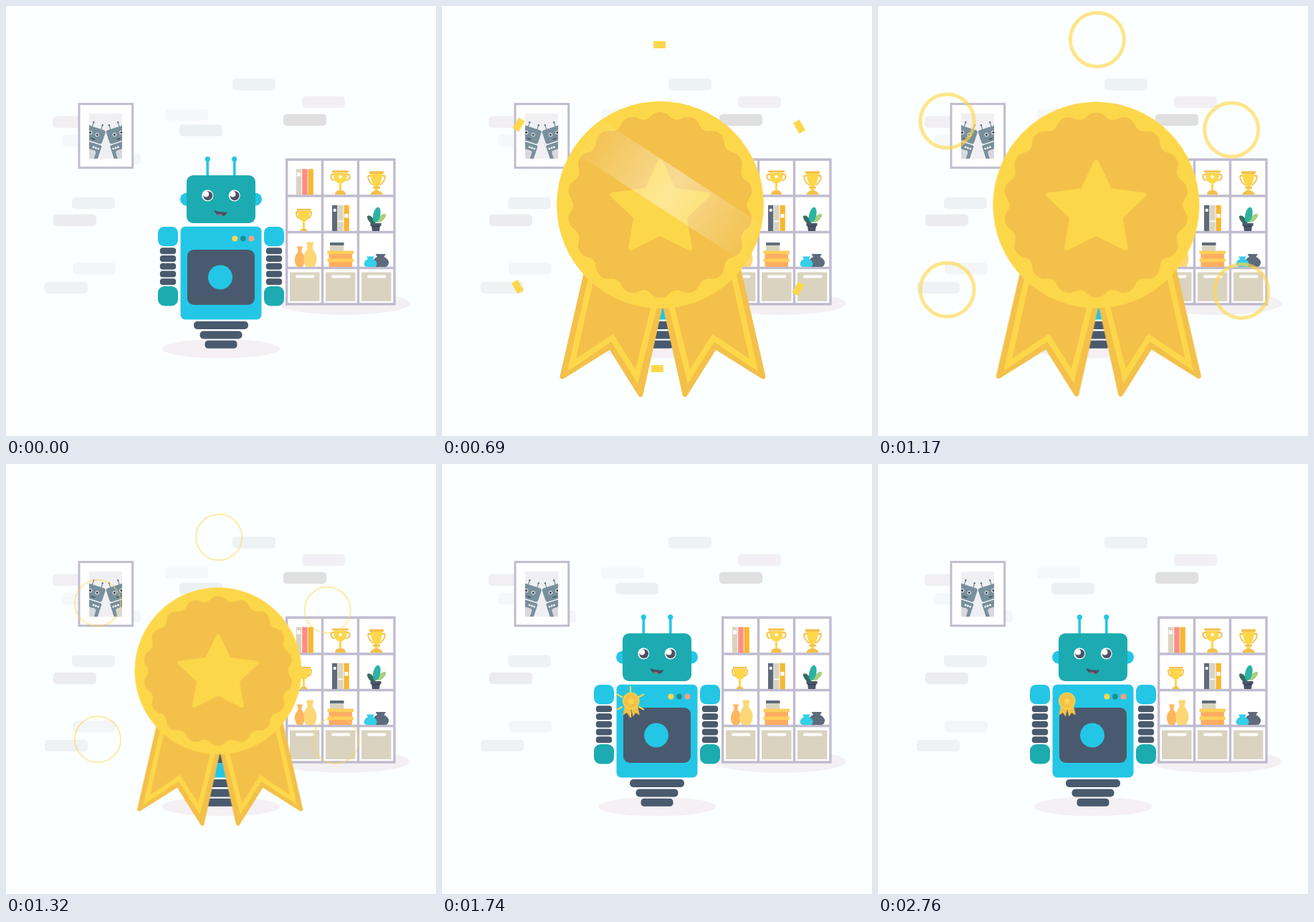
These frames come from a looping animation (600 by 600 pixels, 3600 ms). An HTML page without scripts:

```html
<!DOCTYPE html>
<html lang="en">
<head>
<meta charset="utf-8">
<title>Robot earns a medal</title>
<style>
  html, body { margin: 0; width: 100%; height: 100%; overflow: hidden; background: #fcffff; }
  svg { display: block; width: 100%; height: 100%; }
  .cyan { fill: #24c6e6; }
  .teal { fill: #1cabb0; }
  .slate { fill: #4a5a6e; }
  .gold { fill: #fdd74a; }
  .amber { fill: #f3c04a; }
  .sand { fill: #d9d3c0; }
  .orange { fill: #f7b731; }
  .white { fill: #fff; }

  .grow, .shrink, .ribbon, .shine, .hop, .spark, .rings circle {
    animation: 3.6s linear infinite both;
  }

  .grow { animation-name: grow; transform-origin: 304.5px 277.5px; }
  @keyframes grow {
    0%, .833% { transform: scale(0); animation-timing-function: cubic-bezier(.2, .8, .3, 1); }
    8.333%, 100% { transform: none; }
  }

  .shrink { animation-name: shrink; transform-origin: 260.1px 335.2px; }
  @keyframes shrink {
    0%, 31.667% { transform: scale(1); animation-timing-function: cubic-bezier(.65, 0, .35, 1); }
    45%, 100% { transform: scale(.0816); }
  }

  .ribbon { animation-name: ribbon; }
  .late { animation-delay: 30ms; }
  @keyframes ribbon {
    0%, 5% { transform: translate(42px, -180px); animation-timing-function: cubic-bezier(.33, 1, .68, 1); }
    14.167%, 100% { transform: none; }
  }

  .shine { animation-name: shine; }
  @keyframes shine {
    0%, 15.83% { transform: translateY(-190px); }
    23.6%, 100% { transform: translateY(190px); }
  }

  .spark { animation-name: spark; fill: none; stroke: #fdd74a; stroke-width: 17; }
  .again { animation-delay: 1.41s; }
  @keyframes spark {
    0%, 3.06% { stroke-dasharray: 0 400; stroke-dashoffset: 0; }
    4.72% { stroke-dasharray: 68 400; stroke-dashoffset: 0; }
    6.39% { stroke-dasharray: 116 400; stroke-dashoffset: 0; }
    8.06% { stroke-dasharray: 83 400; stroke-dashoffset: -68; }
    9.72% { stroke-dasharray: 61 400; stroke-dashoffset: -116; }
    12.22% { stroke-dasharray: 37 400; stroke-dashoffset: -165; }
    15% { stroke-dasharray: 21 400; stroke-dashoffset: -197; }
    19.17% { stroke-dasharray: 10 400; stroke-dashoffset: -221; }
    23.33% { stroke-dasharray: 4.2 400; stroke-dashoffset: -232.8; }
    26.67% { stroke-dasharray: 1.8 400; stroke-dashoffset: -237.2; }
    30%, 100% { stroke-dasharray: 0 400; stroke-dashoffset: -240; }
  }

  .rings { fill: none; stroke: #fdd74a; opacity: .65; }
  .rings circle { animation-name: ring; }
  @keyframes ring {
    0%, 23.3% { r: 0; stroke-width: 0; }
    25% { r: 16px; stroke-width: 14px; }
    26.667% { r: 25.5px; stroke-width: 10.8px; }
    30% { r: 34.2px; stroke-width: 7px; }
    31.667% { r: 37.2px; stroke-width: 5.6px; }
    36.667% { r: 39.8px; stroke-width: 1.9px; }
    39%, 100% { r: 40.5px; stroke-width: 0; }
  }

  .hop { animation-name: hop; }
  @keyframes hop {
    0%, 60% { transform: none; animation-timing-function: cubic-bezier(.39, .575, .565, 1); }
    68.75% { transform: translateY(var(--lift)); animation-timing-function: cubic-bezier(.47, 0, .745, .715); }
    76.667%, 100% { transform: none; }
  }
</style>
</head>
<body>
<svg viewBox="0 0 600 600">
  <defs>
    <rect id="brick" width="60" height="16.5" rx="5"/>
    <clipPath id="photo"><rect x="116" y="150" width="46" height="63"/></clipPath>
    <clipPath id="disc"><circle cx="304.5" cy="277.5" r="144.5"/></clipPath>
    <linearGradient id="glow">
      <stop offset="0" stop-color="#fff" stop-opacity="0"/>
      <stop offset=".5" stop-color="#fff" stop-opacity=".42"/>
      <stop offset="1" stop-color="#fff" stop-opacity="0"/>
    </linearGradient>

    <g id="pal" transform="translate(125 180) rotate(18)">
      <path d="M-8 -9V-16M5 -9V-16" stroke="#78909c" stroke-width="1.2"/>
      <circle cx="-8" cy="-16" r="1.3" fill="#66788a"/>
      <circle cx="5" cy="-16" r="1.3" fill="#66788a"/>
      <rect x="-15" y="-10" width="27" height="20" rx="3" fill="#78909c"/>
      <rect x="-13" y="11.5" width="26" height="30" rx="2" fill="#78909c"/>
      <rect x="-12" y="21" width="20" height="20" rx="3" fill="#d8d9de"/>
      <g class="white">
        <circle cx="-8" cy="-1" r="2.6"/><circle cx="2" cy="-1" r="2.6"/>
        <circle cx="2.5" cy="17" r="1.4"/><circle cx="6" cy="17" r="1.4"/><circle cx="9.5" cy="17" r="1.4"/>
      </g>
      <circle cx="-8" cy="-1" r="1.7" fill="#46505e"/>
      <circle cx="2" cy="-1" r="1.7" fill="#46505e"/>
      <path d="M-6 5.5h8q-3 3.5 -8 0z" fill="#46505e"/>
    </g>

    <g id="bin">
      <rect x="396" y="371.500" width="41.500" height="40.500" class="sand"/>
      <rect x="404" y="375.500" width="26.500" height="4" rx="2" class="white"/>
    </g>

    <g id="eye">
      <circle r="8" class="white"/>
      <circle cx=".4" cy=".2" r="6.500" fill="#4f5166"/>
      <circle cx="-2.200" cy="-2" r="4" class="white"/>
    </g>

    <g id="arm">
      <rect x="212" y="308" width="28" height="27.300" rx="8.500" class="cyan"/>
      <g class="slate">
        <rect x="214.800" y="337.200" width="22.400" height="9" rx="4"/>
        <rect x="214.800" y="348" width="22.400" height="9" rx="4"/>
        <rect x="214.800" y="358.800" width="22.400" height="9" rx="4"/>
        <rect x="214.800" y="369.400" width="22.400" height="9" rx="4"/>
        <rect x="214.800" y="380.200" width="22.400" height="9" rx="4"/>
      </g>
      <rect x="212" y="391" width="28" height="27.500" rx="9" class="teal"/>
    </g>

    <g id="tail">
      <path d="M211 330L168 517L235 475L277 542L324 330Z" class="amber" stroke="#f3c04a" stroke-width="7" stroke-linejoin="round"/>
      <path d="M219 330L181 501L237.500 463L271.500 517L318 330" fill="none" stroke="#fdd74a" stroke-width="8"/>
    </g>

    <path id="lobe" d="M-21 -119.200C-12 -120.800 -12 -129.500 0 -129.500S12 -120.800 21 -119.200L0 -60Z"/>
    <g id="lobes">
      <use href="#lobe"/>
      <use href="#lobe" transform="rotate(20)"/>
      <use href="#lobe" transform="rotate(40)"/>
    </g>
  </defs>

  <!-- wall -->
  <use href="#brick" x="316" y="101.500" fill="#edf2f3"/>
  <use href="#brick" x="413" y="125.700" fill="#f2f0f4"/>
  <use href="#brick" x="387" y="150.700" fill="#e0e0e0"/>
  <use href="#brick" x="222" y="143.700" fill="#f5f8f9"/>
  <use href="#brick" x="242" y="165.500" fill="#ebf1f2"/>
  <use href="#brick" x="65" y="153.500" fill="#f1eff2"/>
  <use href="#brick" x="78" y="179.700" fill="#f5f8f9"/>
  <use href="#brick" x="128" y="204.700" fill="#f4f5f7"/>
  <use href="#brick" x="92" y="266.700" fill="#edf2f4"/>
  <use href="#brick" x="66" y="290.700" fill="#ececee"/>
  <use href="#brick" x="93" y="358" fill="#f4f5f6"/>
  <use href="#brick" x="54" y="384.800" fill="#eef2f4"/>

  <rect x="102" y="136.700" width="74.700" height="89" fill="#fff" stroke="#c0bccf" stroke-width="3"/>
  <g clip-path="url(#photo)">
    <rect x="116" y="150" width="46" height="63" fill="#f0eff3"/>
    <use href="#pal"/>
    <use href="#pal" transform="translate(278.600) scale(-1 1)"/>
  </g>

  <!-- shelf -->
  <ellipse cx="472" cy="415" rx="92" ry="16" fill="#f3f0f4"/>
  <path d="M391.700 214.200H542V416H391.700ZM441.500 214V416M491.500 214V416M391 265H542M391 315.500H542M391 365.500H542" fill="#fff" stroke="#c0bccf" stroke-width="3.400"/>
  <use href="#bin"/>
  <use href="#bin" x="50"/>
  <use href="#bin" x="100"/>

  <rect x="405" y="227.500" width="7.200" height="36" class="sand"/>
  <rect x="406" y="232" width="5.200" height="5.500" class="white"/>
  <rect x="413.200" y="227.500" width="7.500" height="36" fill="#ff8d85"/>
  <rect x="421.500" y="227.500" width="7.300" height="36" class="orange"/>

  <g class="gold">
    <rect x="455" y="229.500" width="23" height="3" rx="1" class="amber"/>
    <path d="M457 233H476Q476 246 468 247.500V257H465V247.500Q457 246 457 233Z"/>
    <path d="M458 235H456Q453 235 453.500 239T459 243M475 235H477Q480 235 479.500 239T474 243" fill="none" stroke="#f3c04a" stroke-width="2"/>
    <path d="M459 263.300Q459 257 466.500 257T474 263.300Z" class="amber"/>
    <path d="M466.500 235l1 2h2.200l-1.700 1.600 .5 2.300 -2 -1.200 -2 1.200 .5 -2.300 -1.700 -1.600h2.200z" class="white"/>

    <rect x="507" y="230.500" width="20" height="3.500" class="amber"/>
    <path d="M508.500 234H525.500Q524 247 519.500 252V258H514.500V252Q510 247 508.500 234Z"/>
    <path d="M509 237H505.500Q504 244 512.500 250M525 237H528.500Q530 244 521.500 250" fill="none" stroke="#f3c04a" stroke-width="1.800"/>
    <path d="M512 252H522V254.500H512ZM508 263.300Q510 257.500 517 257.500T526 263.300Z" class="amber"/>

    <rect x="406" y="283" width="19.500" height="2.600" class="amber"/>
    <path d="M407 286H424Q424 299 417 300.500V311H414V300.500Q407 299 407 286Z"/>
    <path d="M408 287.500H405Q404.500 295 410 296M423 287.500H426Q426.500 295 421 296" fill="none" stroke="#f3c04a" stroke-width="1.800"/>
    <path d="M410.500 314Q411 310.500 415.500 310.500T420.500 314Z" class="amber"/>
  </g>

  <rect x="455" y="278" width="7.300" height="36" fill="#5f6b7c"/>
  <circle cx="458.700" cy="285" r="2.200" class="white"/>
  <rect x="463.200" y="278" width="7.300" height="36" class="sand"/>
  <rect x="463.200" y="299.500" width="7.300" height="1.800" class="white"/>
  <rect x="471.500" y="278" width="7.300" height="36" class="orange"/>
  <rect x="472.500" y="290" width="5" height="5.500" class="white"/>

  <ellipse cx="509.500" cy="298.500" rx="3.500" ry="7.500" transform="rotate(-40 509.500 298.500)" fill="#3a6b62"/>
  <ellipse cx="524" cy="296" rx="3.500" ry="8" transform="rotate(45 524 296)" fill="#a9cf7f"/>
  <ellipse cx="517.300" cy="291.500" rx="5" ry="11" transform="rotate(12 517.300 291.500)" fill="#2bb3a3"/>
  <path d="M508.500 303H523.500V307H522L521 314H511L510 307H508.500Z" fill="#4a556a"/>
  <path d="M510 307.500H522" stroke="#333d50"/>

  <path d="M405.500 335.500H414Q412 340 412.500 343C419 350 417.500 359 413.500 364H406.500C402 359 401 350 407.500 343Q408 340 405.500 335.500Z" fill="#ffb661"/>
  <path d="M419 329.500H429.500Q427.500 335 428 339C436 348 434 358 430 364H419C414.500 358 413 348 420.500 339Q421 335 419 329.500Z" fill="#fdd775"/>

  <rect x="452" y="333" width="19.300" height="9" class="sand"/>
  <rect x="452" y="330" width="19.500" height="4" fill="#5f6b7c"/>
  <rect x="450.500" y="345" width="32.500" height="19" fill="#ffad60"/>
  <rect x="448.500" y="341.500" width="36.500" height="4.500" fill="#fdd05a"/>
  <rect x="448.500" y="352.500" width="36.500" height="4.500" rx="1" fill="#fdd05a"/>

  <path d="M515.500 346H530L527.500 350Q535 354 534 359T529 364H516Q511 362 512 357T518 350Z" fill="#5f6b7c"/>
  <path d="M503 349.500H514L512 353Q518 356 517.500 360T514 364H503Q499 363 499.700 359T505 353Z" fill="#34cfe8"/>

  <!-- robot -->
  <ellipse cx="300" cy="478" rx="82" ry="13.500" fill="#f4f0f4"/>
  <rect x="277.500" y="466.800" width="45" height="11" rx="4.500" class="slate"/>
  <rect x="270.500" y="453.500" width="59" height="11" rx="5" class="slate hop" style="--lift:-3.500px"/>
  <rect x="262" y="440" width="76" height="11" rx="5" class="slate hop" style="--lift:-7px"/>

  <g class="hop" style="--lift:-11px">
    <g class="cyan">
      <path d="M281.200 214V238M318.800 214V238" stroke="#24c6e6" stroke-width="3.600"/>
      <circle cx="281.300" cy="213.700" r="3.600"/>
      <circle cx="318.700" cy="213.700" r="3.600"/>
      <circle cx="252" cy="269.700" r="9"/>
      <circle cx="348" cy="269.700" r="9"/>
    </g>
    <rect x="252" y="236.300" width="96" height="66.700" rx="9" class="teal"/>
    <use href="#eye" x="281.300" y="264.500"/>
    <use href="#eye" x="318.700" y="264.500"/>
    <path d="M290.300 285Q299 288.500 309 287.500Q307 293 301 293Q292.500 292.500 290.300 285Z" fill="#4a4f63"/>
    <path d="M295 291Q299 288.500 303 292.800Q298 293.500 295 291Z" fill="#8a7a88"/>

    <use href="#arm"/>
    <use href="#arm" x="148"/>
    <rect x="243.500" y="307.800" width="113" height="129.700" rx="6.500" class="cyan"/>
    <circle cx="319.300" cy="324.500" r="4" class="gold"/>
    <circle cx="330.900" cy="324.500" r="4" fill="#1c8f96"/>
    <circle cx="342.500" cy="324.500" r="4" fill="#f3a183"/>
    <rect x="253" y="340" width="94" height="77" rx="9" class="slate"/>
    <circle cx="299" cy="378.500" r="17" class="cyan"/>

    <!-- small burst, then the medal -->
    <path class="spark again" transform="translate(263 332) scale(.129)" d="M0 0V-250M0 0V250M0 0L216.500 -125M0 0L216.500 125M0 0L-216.500 -125M0 0L-216.500 125"/>

    <g class="shrink">
      <path class="spark" transform="translate(302 280) rotate(.4)" d="M0 0V-250M0 0V250M0 0L216.500 -125M0 0L216.500 125M0 0L-216.500 -125M0 0L-216.500 125"/>
      <g class="grow">
        <g class="ribbon late"><use href="#tail"/></g>
        <g transform="translate(616) scale(-1 1)">
          <g class="ribbon"><use href="#tail"/></g>
        </g>
        <circle cx="304.500" cy="277.500" r="144.500" class="gold"/>
        <g transform="translate(304.500 277.500)" class="amber">
          <circle r="120.500"/>
          <use href="#lobes"/>
          <use href="#lobes" transform="rotate(60)"/>
          <use href="#lobes" transform="rotate(120)"/>
          <use href="#lobes" transform="rotate(180)"/>
          <use href="#lobes" transform="rotate(240)"/>
          <use href="#lobes" transform="rotate(300)"/>
        </g>
        <path d="M304.500 217.500L323.500 257.500L371 263.500L338 294.500L345.500 337.500L304.500 317L263.500 337.500L271 294.500L238 263.500L285.500 257.500Z" class="gold" stroke="#fdd74a" stroke-width="7" stroke-linejoin="round"/>
        <g clip-path="url(#disc)">
          <g transform="translate(304.500 277.500) rotate(33)">
            <rect class="shine" x="-145" y="-29" width="290" height="58" fill="url(#glow)"/>
          </g>
        </g>
      </g>
      <g class="rings">
        <circle cx="306" cy="46"/>
        <circle cx="494" cy="172"/>
        <circle cx="508" cy="398"/>
        <circle cx="96" cy="160"/>
        <circle cx="96" cy="396"/>
      </g>
    </g>
  </g>
</svg>
</body>
</html>
```
